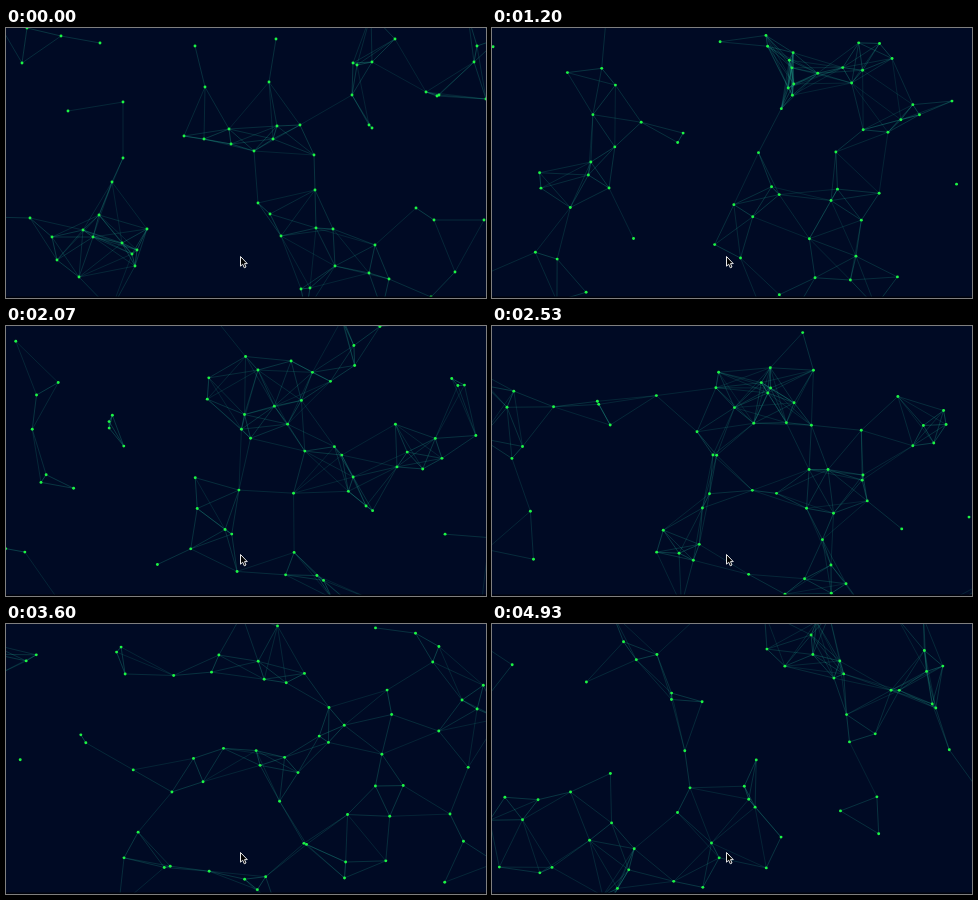
Recreate the animation shown at these times as an HTML page with a canvas. Size 480 by 270 pixels, loop 4990 ms.

```html
<!DOCTYPE html>
<html lang="en">
<head>
<meta charset="utf-8">
<title>Drifting network</title>
<style>
  html, body { margin: 0; width: 100%; height: 100%; overflow: hidden; background: #000a24; }
  canvas { display: block; width: 100vw; height: 100vh; }
</style>
</head>
<body>
<canvas id="stage" width="480" height="270"></canvas>
<script>
const W = 480, H = 270, PAD = 20;
const LOOP = 4990, FRAMES = 75, REACH = 62;
const ctx = document.getElementById('stage').getContext('2d');

// Opening layout as x, y pairs; the last rows lie just outside the stage.
const start = [
  16,35, 21,0, 55,8, 94,15, 189,18, 270,11, 199,59, 263,54, 62,83, 117,74,
  117,130, 106,154, 178,108, 198,111, 223,101, 225,116, 248,123, 267,111,
  271,98, 294,97, 308,127, 309,162, 252,175, 264,186, 275,208, 310,200,
  327,201, 369,217, 329,238, 363,245, 383,251, 295,261, 304,260, 425,269,
  449,244, 428,192, 410,180, 478,192, 389,11, 347,35, 351,37, 366,34,
  346,67, 363,97, 366,100, 420,64, 431,68, 433,67, 468,34, 471,18, 480,71,
  24,190, 46,209, 51,232, 77,202, 87,209, 93,187, 116,215, 126,226,
  131,222, 129,238, 141,201, 73,249,
  -8,-6, 365,-14, -16,189, 105,282, 300,284, 376,282, 462,-12, 494,10
];

function seeded(seed) {
  return () => {
    seed = (seed * 16807) % 2147483647;
    return seed / 2147483647;
  };
}

const random = seeded(4127);
const dots = [];
for (let i = 0; i < start.length; i += 2) {
  const angle = random() * Math.PI * 2;
  const speed = 0.04 + random() * 0.06; // px per ms
  dots.push({
    x: start[i], y: start[i + 1],
    vx: Math.cos(angle) * speed, vy: Math.sin(angle) * speed
  });
}

// Leaves on one side, returns on the other, out of sight.
function wrap(v, size) {
  const span = size + 2 * PAD;
  return ((v + PAD) % span + span) % span - PAD;
}

const place = t => dots.map(d => ({
  x: wrap(d.x + d.vx * t, W),
  y: wrap(d.y + d.vy * t, H)
}));

function drawLinks(points) {
  ctx.lineWidth = 0.8;
  points.forEach((a, i) => {
    for (const b of points.slice(i + 1)) {
      const dist = Math.hypot(a.x - b.x, a.y - b.y);
      if (dist > REACH) continue;
      const alpha = 0.17 + 0.28 * (1 - dist / REACH);
      ctx.strokeStyle = `rgba(40, 190, 160, ${alpha})`;
      ctx.beginPath();
      ctx.moveTo(a.x, a.y);
      ctx.lineTo(b.x, b.y);
      ctx.stroke();
    }
  });
}

function drawDots(points) {
  ctx.fillStyle = '#1cf545';
  for (const p of points) {
    ctx.beginPath();
    ctx.arc(p.x, p.y, 1.45, 0, Math.PI * 2);
    ctx.fill();
  }
}

const arrow = new Path2D('M234.5 228.5V238.2L236.7 236.2L238.3 239.8L240 239L238.5 235.6H241.3Z');

function drawPointer() {
  ctx.lineWidth = 1;
  ctx.fillStyle = '#000';
  ctx.strokeStyle = '#e8e8e8';
  ctx.fill(arrow);
  ctx.stroke(arrow);
}

function draw(t) {
  const points = place(t);
  ctx.fillStyle = '#000a24';
  ctx.fillRect(0, 0, W, H);
  drawLinks(points);
  drawDots(points);
  ctx.fillStyle = '#00020a';
  ctx.fillRect(0, H - 1.5, W, 1.5);
  drawPointer();
}

// Fifteen steps a second, each starting on a multiple of 10 ms.
const stepStart = k => Math.round(k * 20 / 3) * 10;

function stepAt(t) {
  let k = Math.min(FRAMES - 1, Math.ceil(t * 3 / 200));
  while (stepStart(k) > t) k--;
  return k;
}

const begin = performance.now();
let shown = -1;

function tick() {
  const k = stepAt(Math.max(0, performance.now() - begin) % LOOP);
  if (k !== shown) {
    shown = k;
    draw(stepStart(k));
  }
  requestAnimationFrame(tick);
}

draw(0);
requestAnimationFrame(tick);
</script>
</body>
</html>
```
